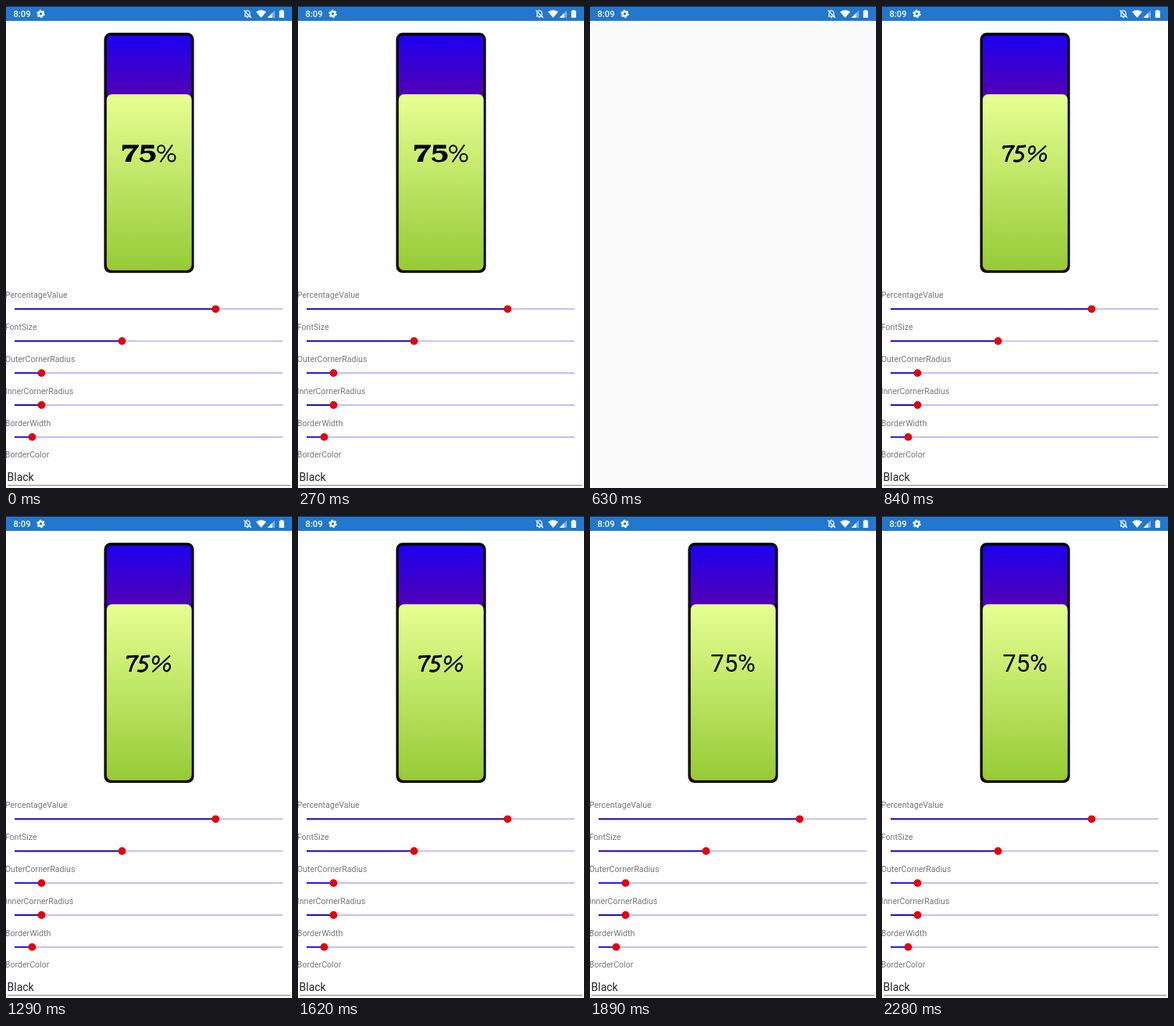
Recreate the animation shown at these times as an HTML page. Size 366x616 px, loop 2310 ms.

```html
<!DOCTYPE html>
<html lang="en">
<head>
<meta charset="utf-8">
<title>Progress bar fonts</title>
<style>
html, body { margin: 0; width: 100%; height: 100%; overflow: hidden; background: #fafafa; }
svg { display: block; width: 366px; height: 616px; font-family: Roboto, sans-serif; }
.label { font-size: 10.6px; fill: #777; }
</style>
</head>
<body>
<svg viewBox="0 0 366 616">
  <defs>
    <linearGradient id="outer" x2="0" y2="1">
      <stop stop-color="#1c00f2"/><stop offset="1" stop-color="#f00000"/>
    </linearGradient>
    <linearGradient id="inner" x2="0" y2="1">
      <stop stop-color="#e6ff92"/><stop offset="1" stop-color="#95cb35"/>
    </linearGradient>
  </defs>
  <rect width="366" height="616" fill="#fafafa"/>

  <g id="page">
    <rect width="366" height="616" fill="#fff"/>
    <rect x="127.2" y="36" width="111.6" height="303.4" rx="6.5" fill="url(#outer)" stroke="#000" stroke-width="3.4"/>
    <rect x="128.8" y="112.7" width="108.8" height="225" rx="7" fill="url(#inner)"/>

    <g id="wide" role="img" aria-label="75%">
      <path d="M149 177.5H170V179.5C164 186 160.5 192 160 199H152.5C154 192 158.5 187 163.5 182.3H154C152 182.3 151.3 183 150.6 185H148.8Z"/>
      <path d="M173.5 177.5H189.5V182.3H177.5L177 185.5C178.5 185 181 184.7 183 184.7C188.5 184.7 191.5 187.6 191.5 191.6C191.5 196.5 187.3 199.5 181 199.5C175.5 199.5 171.7 197.7 171 194.5L174.5 193C175 195.8 178 197 180.5 197C183.5 197 185 195 185 192.2C185 189.3 183 187.8 179.8 187.8C177 187.8 175.3 188.5 174 189.5H172.3Z"/>
      <g fill="none" stroke="#000" stroke-width="2">
        <ellipse cx="198.6" cy="183" rx="4.5" ry="4.8"/>
        <ellipse cx="212" cy="193.8" rx="4.5" ry="4.8"/>
        <path d="M213 177.5L197.5 199.5"/>
      </g>
    </g>

    <g id="script" role="img" aria-label="75%" fill="none" stroke="#000" stroke-width="3" stroke-linejoin="round">
      <path d="M155 182.5L156 179.7Q162 179.8 168.5 179.3Q161 188 158.8 199"/>
      <path d="M184 178.8Q179 180.2 174.5 179.7L172 187.3C178 186.4 181 188.8 180.2 192.8C179.2 198 172.5 199.2 168.3 197.3"/>
      <g stroke-width="2.3">
        <ellipse cx="191.8" cy="184.2" rx="3.8" ry="5" transform="rotate(18 191.8 184.2)"/>
        <ellipse cx="206" cy="193.3" rx="3.8" ry="5" transform="rotate(18 206 193.3)"/>
        <path d="M210 178.5L187.5 199.3" stroke-width="1.9"/>
      </g>
    </g>

    <text id="plain" x="183" y="199" font-size="31" text-anchor="middle">75%</text>

    <g id="sliders"></g>
    <text class="label" x="-1.2" y="577.3">BorderColor</text>
    <text x="1.5" y="607" font-size="14" fill="#222">Black</text>
    <path d="M2 612.5H364" stroke="#858585"/>
  </g>

  <g id="status" fill="#fff">
    <rect width="366" height="19" fill="#2277ce"/>
    <rect width="366" height="1" fill="#102b45"/>
    <text x="9.5" y="14" font-size="11.2" font-weight="500">8:09</text>
    <g fill="none" stroke="#fff">
      <circle cx="44.5" cy="10" r="2.9" stroke-width="2.4"/>
      <circle cx="44.5" cy="10" r="4.5" stroke-width="1.5" stroke-dasharray="2.3 2.41"/>
      <path d="M306 13V9Q306 6 309 6Q312 6 312 9V13M305 13.2H313M309 4.8V6M308 14.7H310" stroke-width="1.2"/>
      <path d="M304.5 5.5L313.8 15" stroke-width="1.2"/>
    </g>
    <path d="M320 7.5Q326.5 2.8 333 7.5L326.5 15Z"/>
    <path d="M334.5 15L344 5.5V15Z" opacity=".4"/>
    <path d="M334.5 15L340.5 9V15Z"/>
    <path d="M349.7 6H351.3V5H354.2V6H355.8V15H349.7Z"/>
  </g>
</svg>
<script>
const LOOP = 2310;
const byId = id => document.getElementById(id);

const sliders = [
  ["PercentageValue", 268.3, "#1c10b4"],
  ["FontSize", 148.5, "#1c10b4"],
  ["OuterCornerRadius", 45.5, "#2418f4"],
  ["InnerCornerRadius", 45.5, "#1c10b4"],
  ["BorderWidth", 33.5, "#2418f4"]
];
byId("sliders").innerHTML = sliders.map(([name, x, color], i) => {
  const y = 387.3 + i * 40.9;
  return `<text class="label" x="-1.2" y="${y - 14}">${name}</text>
    <path d="M11 ${y}H354" stroke="#c2bff2" stroke-width="2"/>
    <path d="M11 ${y}H${x}" stroke="${color}" stroke-width="2"/>
    <circle cx="${x}" cy="${y}" r="4.9" fill="#e60008"/>`;
}).join("");

// Start time and what is visible from then on
const scenes = [[0, "wide"], [600, ""], [690, "script"], [1680, ""], [1770, "plain"]];
const faces = ["wide", "script", "plain"];

function show(id, on) {
  byId(id).style.display = on ? "" : "none";
}

function draw(t) {
  const face = scenes.filter(s => s[0] <= t).pop()[1];
  show("page", face !== "");
  faces.forEach(id => show(id, id === face));
}

const start = performance.now();
function tick() {
  draw((performance.now() - start) % LOOP);
  requestAnimationFrame(tick);
}
tick();
</script>
</body>
</html>
```
